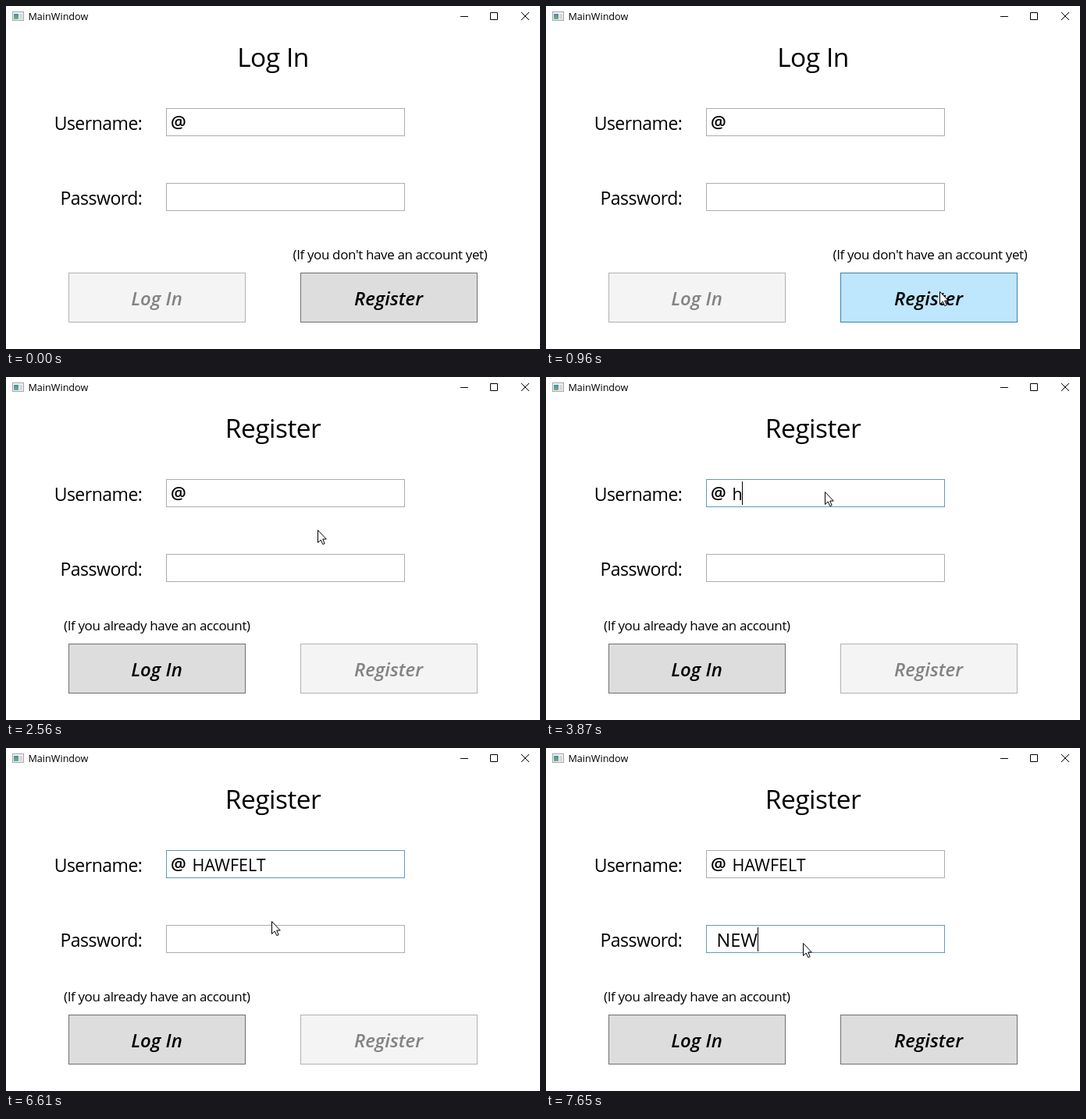
Recreate the animation shown at these times as an HTML page. Size 684 px wide and 440 px high, loop 8000 ms.

```html
<!DOCTYPE html>
<html lang="en">
<head>
<meta charset="utf-8">
<title>Log in and register form</title>
<style>
  html, body { margin: 0; width: 100%; height: 100%; overflow: hidden; background: #fff; }
  svg { display: block; width: 684px; height: 440px; font-family: "Open Sans", "Noto Sans", sans-serif; }
  .title { font-size: 33.5px; letter-spacing: -.5px; text-anchor: middle; }
  .label { font-size: 23px; letter-spacing: -.5px; text-anchor: end; }
  .hint { font-size: 17px; letter-spacing: -.38px; }
  .button { font: italic 600 24px "Open Sans", "Noto Sans", sans-serif; text-anchor: middle; }
  .line { fill: none; stroke: #000; }
  .field { fill: #fff; }
</style>
</head>
<body>
<svg viewBox="0 0 684 440">
  <defs>
    <linearGradient id="pane" x2="0" y2="1">
      <stop offset="0" stop-color="#4a8fa0"/><stop offset="1" stop-color="#6fae8c"/>
    </linearGradient>
  </defs>
  <rect x="8.5" y="7.5" width="14" height="11" fill="#f2f2f2" stroke="#a3a7ab"/>
  <rect x="10" y="10" width="6" height="7" fill="url(#pane)"/>
  <rect x="17" y="10" width="4" height="7" fill="#d5d9dc"/>
  <text x="28.5" y="18" font-size="12.6">MainWindow</text>
  <path class="line" d="M582 13.5h10M620.5 8.5h9v9h-9z"/>
  <path class="line" d="M660 8l10 10M670 8l-10 10"/>

  <text class="title" id="title" x="342" y="78"></text>
  <text class="label" x="174.5" y="159">Username:</text>
  <text class="label" x="174.5" y="255">Password:</text>

  <rect class="field" id="userBox" x="205.5" y="131.5" width="305" height="35"/>
  <text x="211" y="157" font-size="22" font-weight="600">@</text>
  <text id="userText" x="238.5" y="158" font-size="21.5"></text>
  <rect id="userCaret" y="134" width="1" height="30"/>

  <rect class="field" id="passBox" x="205.5" y="227.5" width="305" height="35"/>
  <text id="passText" x="218.5" y="255" font-size="23.5"></text>
  <rect id="passCaret" y="230" width="1" height="31"/>

  <text class="hint" id="hint" y="325"></text>
  <rect id="loginBox" x="80.5" y="342.5" width="226" height="63"/>
  <text class="button" id="loginText" x="193" y="384">Log In</text>
  <rect id="registerBox" x="377.5" y="342.5" width="226" height="63"/>
  <text class="button" id="registerText" x="490" y="384">Register</text>

  <g id="cursor">
    <path id="arrow" fill="#fff" stroke="#000" stroke-linejoin="round"
          d="M-.5 .5V16.5L3.2 13L5.8 18.6L8.2 17.6L5.7 12H10.3Z"/>
    <path id="beam" class="line" d="M-3 -8.5H0M1 -8.5H4M.5 -8V8M-3 8.5H0M1 8.5H4"/>
  </g>
</svg>
<script>
const LOOP = 8000;
const $ = id => document.getElementById(id);
const set = (id, attrs) => {
  for (const key in attrs) $(id).setAttribute(key, attrs[key]);
};
const show = (id, on) => set(id, { visibility: on ? "visible" : "hidden" });
const between = (t, a, b) => t >= a && t < b;

// Latest value of a [time, value] list
const at = (keys, t) => keys.reduce((value, [time, next]) => t >= time ? next : value, keys[0][1]);

const userKeys = [[0, ""], [3870, "h"], [4430, ""], [4750, "H"], [4910, "HA"], [5080, "HAW"],
  [5650, "HAWF"], [5720, "HAWFE"], [5960, "HAWFEL"], [6050, "HAWFELT"]];
const passKeys = [[0, ""], [7340, "N"], [7510, "NE"], [7650, "NEW"]];

// Pointer moves: start, end, stops in equal time steps
const moves = [
  [480, 1100, [[15, 273], [95, 293], [195, 317], [300, 338], [395, 353], [460, 361], [505, 366], [510, 376], [511, 383]]],
  [2250, 2650, [[505, 358], [480, 310], [440, 250], [400, 196], [370, 160], [358, 147]]],
  [6450, 6750, [[357, 158], [350, 190], [341, 222], [333, 244], [330, 250]]]
];

function pointer(t) {
  const move = moves.filter(m => t >= m[0]).pop();
  if (!move) return null;
  const [start, end, stops] = move, last = stops.length - 1;
  return stops[Math.min(last, Math.floor((t - start) / (end - start) * last))];
}

const inside = (p, x, y, w, h) => p && between(p[0], x, x + w) && between(p[1], y, y + h);

const buttonLooks = {
  normal: ["#ddd", "#707070", "#000"],
  hover: ["#bee6fd", "#3c7fb1", "#000"],
  pressed: ["#c4e5f6", "#2c628b", "#000"],
  disabled: ["#f4f4f4", "#adb2b5", "#838383"]
};

function button(name, look) {
  const [fill, stroke, ink] = buttonLooks[look];
  set(name + "Box", { fill, stroke });
  set(name + "Text", { fill: ink });
}

function field(name, text, focused, hovered, caretOn) {
  const label = $(name + "Text");
  label.textContent = text;
  set(name + "Box", { stroke: focused ? "#6299c0" : hovered ? "#7eb4ea" : "#abadb3" });
  const width = text ? label.getComputedTextLength() : 0;
  set(name + "Caret", { x: Math.floor(+label.getAttribute("x") + width) });
  show(name + "Caret", caretOn);
}

function draw(t) {
  const registering = t >= 1830;
  const p = pointer(t);
  const overUser = inside(p, 205, 131, 306, 36);
  const overPass = inside(p, 205, 227, 306, 36);
  const overRegister = inside(p, 377, 342, 227, 64);

  $("title").textContent = registering ? "Register" : "Log In";
  $("hint").textContent = registering ? "(If you already have an account)" : "(If you don't have an account yet)";
  set("hint", { x: registering ? 74 : 367.5 });

  button("login", registering ? "normal" : "disabled");
  button("register", registering ? (t >= 7650 ? "normal" : "disabled")
    : t >= 1760 ? "pressed" : overRegister ? "hover" : "normal");

  field("user", at(userKeys, t), between(t, 2810, 6680), overUser,
    between(t, 2810, 3300) || between(t, 3780, 4360) || between(t, 4430, 6600));
  field("pass", at(passKeys, t), t >= 6680, overPass, t >= 6680);

  // The text beam turns back into an arrow while typing
  const typing = between(t, 3870, 6450) || t >= 7340;
  const beam = !typing && (overUser || overPass);
  show("arrow", p && !beam);
  show("beam", p && beam);
  if (p) set("cursor", { transform: `translate(${p})` });
}

function tick(now) {
  draw(now % LOOP);
  requestAnimationFrame(tick);
}
draw(0);
requestAnimationFrame(tick);
</script>
</body>
</html>
```
